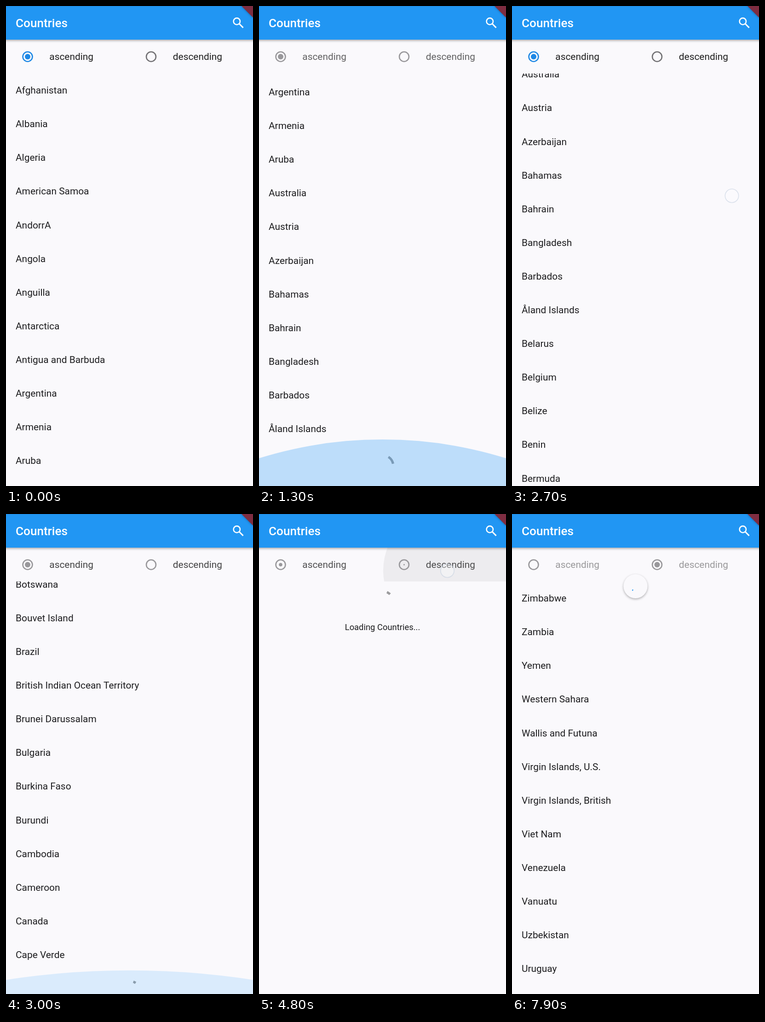
Recreate the animation shown at these times as an HTML page with a canvas. Size 537x1042 px, loop 8 s.

```html
<!DOCTYPE html>
<html lang="en">
<head>
<meta charset="utf-8">
<title>Countries</title>
<style>
  html, body { margin: 0; height: 100%; overflow: hidden; background: #faf9fc; }
  canvas { display: block; }
</style>
</head>
<body>
<canvas id="stage" width="537" height="1042"></canvas>
<script>
const W = 537, H = 1042, LOOP = 8000, STEP = 100;
const BAR = 73, LIST_TOP = 146.5, ROW = 73.1, DP = 1.305;
const BG = '#faf9fc', BLUE = '#2196f3', RADIO_BLUE = '#1e88e5', TAU = Math.PI * 2;
const ctx = document.getElementById('stage').getContext('2d');

const ascending = ('Afghanistan|Albania|Algeria|American Samoa|AndorrA|Angola|Anguilla|Antarctica|' +
  'Antigua and Barbuda|Argentina|Armenia|Aruba|Australia|Austria|Azerbaijan|Bahamas|Bahrain|' +
  'Bangladesh|Barbados|Åland Islands|Belarus|Belgium|Belize|Benin|Bermuda|Bhutan|Bolivia|' +
  'Bosnia and Herzegovina|Botswana|Bouvet Island|Brazil|British Indian Ocean Territory|' +
  'Brunei Darussalam|Bulgaria|Burkina Faso|Burundi|Cambodia|Cameroon|Canada|Cape Verde|' +
  'Cayman Islands').split('|');
const descending = ('Zimbabwe|Zambia|Yemen|Western Sahara|Wallis and Futuna|Virgin Islands, U.S.|' +
  'Virgin Islands, British|Viet Nam|Venezuela|Vanuatu|Uzbekistan|Uruguay').split('|');

// Timeline in ms
const LOADED = [2150, 3930, 5700];
const SPIN = [1155, 2910, 4695];
const BUSY = [[1190, LOADED[0]], [2940, LOADED[1]], [4720, LOADED[2]], [7100, 9000]];
const GLOW_PEAKS = [1265, 3055];
const SWITCH = 4725, RELEASE = 6950, REFRESH = 7100;
const SCROLL = [[1000, 0], [1150, 240], [1255, 654], [2600, 654], [2700, 912], [3010, 2116]];
const TOUCHES = [
  { down: 900, up: 1100, x: 478, path: [[1000, 625], [1150, 350]] },
  { down: 2550, up: 2600, x: 478, path: [[2550, 670], [2700, 412]] },
  { down: 4600, up: 4700, x: 409.5, path: [[4600, 123]] },
  { down: 6500, up: RELEASE, x: 364.5, path: [[6600, 198], [6900, 507]] }
];

const ramp = (t, a, b) => Math.min(1, Math.max(0, (t - a) / (b - a)));

function track(t, keys) {
  let value = keys[0][1];
  for (let i = 1; i < keys.length; i++) {
    value += (keys[i][1] - keys[i - 1][1]) * ramp(t, keys[i - 1][0], keys[i][0]);
  }
  return value;
}

// cubic-bezier(.4, 0, .2, 1)
function fastOutSlowIn(x) {
  let lo = 0, hi = 1;
  for (let i = 0; i < 20; i++) {
    const s = (lo + hi) / 2, r = 1 - s;
    if (1.2 * r * r * s + 0.6 * r * s * s + s ** 3 < x) lo = s; else hi = s;
  }
  return 3 * (1 - lo) * lo * lo + lo ** 3;
}

function text(str, x, centerY, size = 16 * DP, color = '#1d1d1f', weight = 400) {
  ctx.font = `${weight} ${size}px Roboto, sans-serif`;
  ctx.fillStyle = color;
  ctx.fillText(str, x, centerY + size * 0.3415);
}

function disc(x, y, r, color) {
  ctx.beginPath();
  ctx.arc(x, y, r, 0, TAU);
  ctx.fillStyle = color;
  ctx.fill();
}

function arc(x, y, r, width, color, start = 0, sweep = TAU) {
  ctx.beginPath();
  ctx.arc(x, y, r, start, start + sweep);
  ctx.lineWidth = width;
  ctx.strokeStyle = color;
  ctx.stroke();
}

function shadow(blur, offset, alpha) {
  ctx.shadowColor = `rgba(0,0,0,${alpha})`;
  ctx.shadowBlur = blur;
  ctx.shadowOffsetY = offset;
}

// Indeterminate progress: 1333 ms stroke cycle, 2222 ms rotation
function spinner(x, y, r, width, color, age) {
  const p = (age % 1333) / 1333;
  const head = fastOutSlowIn(ramp(p, 0, 0.5)), tail = fastOutSlowIn(ramp(p, 0.5, 1));
  const start = (-0.25 + tail * 0.75 + age / 2222 + p * 0.25) * TAU;
  arc(x, y, r, width, color, start, Math.max((head - tail) * 0.75 * TAU, 0.2));
}

function loader(y, age) {
  spinner(268.5, y, 18 * DP, 4 * DP, '#9c9c9e', age);
}

function drawList(t) {
  ctx.save();
  ctx.beginPath();
  ctx.rect(0, LIST_TOP, W, H);
  ctx.clip();
  if (t >= SPIN[2] && t < LOADED[2]) {
    loader(191, t - SPIN[2]);
    ctx.textAlign = 'center';
    text('Loading Countries...', 268.5, 246, 18.4);
  } else {
    const scroll = t < SPIN[2] ? track(t, SCROLL) : 0;
    const count = t < LOADED[0] ? 20 : t < LOADED[1] ? 40 : 41;
    const rows = t < SPIN[2] ? ascending.slice(0, count) : descending;
    rows.forEach((name, i) => text(name, 21, LIST_TOP + (i + 0.5) * ROW - scroll));
    const page = t < LOADED[0] ? 0 : 1;
    if (t >= SPIN[page] && t < LOADED[page]) {
      loader(LIST_TOP + count * ROW + 44 - scroll, t - SPIN[page]);
    }
  }
  ctx.restore();
}

function drawGlow(t) {
  for (const peak of GLOW_PEAKS) {
    const size = ramp(t, peak - 100, peak) * (1 - ramp(t, peak, peak + 600)) ** 2;
    if (!size) continue;
    ctx.beginPath();
    ctx.ellipse(268.5, H + (805 - 114) * size, 805, 805 * size, 0, 0, TAU);
    ctx.fillStyle = `rgba(33,150,243,${0.32 * size})`;
    ctx.fill();
  }
}

function drawRipple(t) {
  if (t < 4650 || t >= 5000) return;
  ctx.save();
  ctx.beginPath();
  ctx.rect(268.5, BAR, W, LIST_TOP - BAR);
  ctx.clip();
  const alpha = 0.05 * (1 - ramp(t, 4800, 5000));
  disc(409, 123, track(t, [[4650, 40], [4800, 139], [4900, 185]]), `rgba(0,0,0,${alpha})`);
  ctx.restore();
}

function drawRadios(t) {
  const busy = BUSY.some(([a, b]) => t >= a && t < b);
  const fade = BUSY.reduce((sum, [a, b]) => sum + ramp(t, a, a + 200) - ramp(t, b, b + 200), 0);
  const p = ramp(t, SWITCH, SWITCH + 200);
  const radio = (label, x, dot, selected) => {
    const color = busy ? '#99989b' : selected ? RADIO_BLUE : '#737275';
    arc(x, 110, 8 * DP, 2 * DP, color);
    if (dot > 0) disc(x, 110, 4.6 * DP * dot, color);
    text(label, x + 47.3, 110, 16 * DP, `rgba(0,0,0,${0.88 - 0.49 * fade})`);
  };
  radio('ascending', 47, 1 - p, t < SWITCH);
  radio('descending', 315.5, p ** 1.4, t >= SWITCH);
}

function drawRefresh(t) {
  const pull = ramp(track(t, TOUCHES[3].path), 222, 446);
  if (!pull) return;
  const factor = 1.5 * pull + (1 - 1.5 * pull) * ramp(t, RELEASE, REFRESH);
  const y = 156.8 + (factor - 1) * 114.8;
  ctx.save();
  ctx.beginPath();
  ctx.rect(0, BAR, W, H);
  ctx.clip();
  shadow(5, 2, 0.3);
  disc(268.5, y, 20 * DP, '#faf9fc');
  shadow(0, 0, 0);
  if (t >= REFRESH) {
    spinner(268.5, y, 8 * DP, 2 * DP, BLUE, t - 6590);
  } else {
    const armed = Math.min(1, pull * 1.5);
    ctx.globalAlpha = armed;
    arc(268.5, y, 8 * DP, 2 * DP, BLUE, -TAU / 4 + armed * 2, armed * 0.73 * TAU);
  }
  ctx.restore();
}

function drawBar() {
  ctx.save();
  shadow(5, 2, 0.35);
  ctx.fillStyle = BLUE;
  ctx.fillRect(-10, 0, W + 20, BAR);
  ctx.restore();
  ctx.fillStyle = '#2088dc';
  ctx.fillRect(0, 0, W, 1);
  text('Countries', 21, 37.3, 20 * DP, '#fff', 500);

  arc(501.8, 33.3, 5.5 * DP, 2 * DP, '#fff');
  ctx.beginPath();
  ctx.moveTo(507, 38.5);
  ctx.lineTo(515.6, 47.1);
  ctx.lineWidth = 2.9;
  ctx.stroke();

  ctx.save();
  shadow(5, 0, 0.4);
  ctx.beginPath();
  ctx.moveTo(511, -1);
  ctx.lineTo(W + 1, 26);
  ctx.lineTo(W + 1, -1);
  ctx.fillStyle = '#7e2d41';
  ctx.fill();
  ctx.restore();
}

function drawTouches(t) {
  for (const { down, up, x, path } of TOUCHES) {
    const alpha = ramp(t, down - 100, down) * (1 - ramp(t, up, up + 200));
    if (!alpha) continue;
    const y = track(t, path);
    ctx.globalAlpha = alpha;
    disc(x, y, 15, 'rgba(252,252,254,.7)');
    arc(x, y, 14.7, 1.6, '#bccadb');
    ctx.globalAlpha = 1;
  }
}

function draw() {
  const t = Math.floor((performance.now() % LOOP) / STEP) * STEP;
  ctx.fillStyle = BG;
  ctx.fillRect(0, 0, W, H);
  ctx.textAlign = 'left';
  drawList(t);
  drawGlow(t);
  drawRipple(t);
  drawRadios(t);
  drawRefresh(t);
  drawBar();
  drawTouches(t);
  requestAnimationFrame(draw);
}
draw();
</script>
</body>
</html>
```
